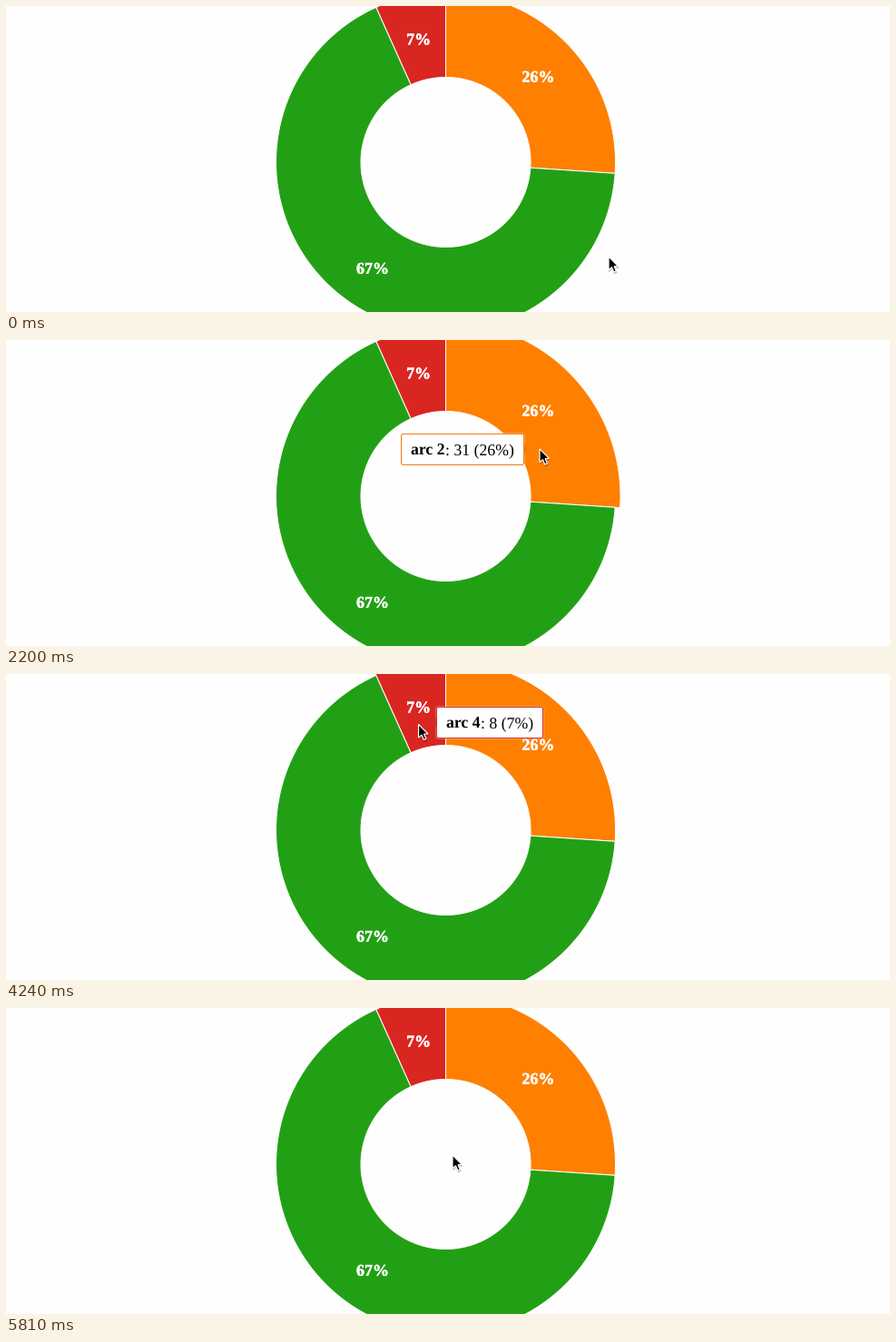
A matplotlib script for the animation above (5.91 s loop, 974x337 px).

```python
import numpy as np
import matplotlib.pyplot as plt
from matplotlib.animation import FuncAnimation
from matplotlib.colors import to_rgb
from matplotlib.patches import FancyBboxPatch, Polygon
from matplotlib.patheffects import withStroke

W, H, DPI = 974, 337, 100
STEP, FRAMES = 30, 197
PX = 72 / DPI
CX, CY, R_OUT, R_IN, GROW = 484.5, 172, 187, 93.5, 5.5
TICK = LAG = 60
LABEL_SIZE, TIP_SIZE = 18, 17.8
PAD, GAP, TIP_H = 11, 17, 34

ARCS = [("arc 2", 31, "#ff7f00"), ("arc 3", 80, "#22a015"),
        ("arc 4", 8, "#d92621")]
TOTAL = sum(value for _, value, _ in ARCS)
BOUNDS = np.cumsum([0] + [value for _, value, _ in ARCS]) / TOTAL * 2 * np.pi

# pointer glides: first and last change, points passed at an even pace
GLIDES = [
    (600, 850, [(664, 276), (518, 269)]),
    (1390, 2200, [(518, 269), (588, 120)]),
    (2850, 3830, [(588, 120), (534, 79), (480, 45), (462, 48)]),
    (4120, 5100, [(462, 48), (452, 58), (424, 66), (376, 105), (371, 111)]),
    (5400, 5810, [(371, 111), (492, 162)]),
]
TIMES = np.concatenate([np.linspace(a - LAG, b - LAG, len(p))
                        for a, b, p in GLIDES])
POINTS = np.concatenate([p for _, _, p in GLIDES])
TICKS = np.concatenate([[0]] + [np.linspace(a, b, round((b - a) / TICK) + 1)
                                for a, b, _ in GLIDES])


def pointer(t):
    return np.array([np.interp(t, TIMES, axis) for axis in POINTS.T])


def arc_under(x, y):
    dx, dy = x - CX, y - CY
    if not R_IN < np.hypot(dx, dy) < R_OUT:
        return None
    angle = np.arctan2(dx, -dy) % (2 * np.pi)
    return int(np.searchsorted(BOUNDS, angle)) - 1


def hover_states():
    """Per tick: how far each arc has grown, and the arc hovered last."""
    levels, last, states = np.zeros(len(ARCS)), 0, []
    for s in TICKS:
        hit = arc_under(*pointer(s - LAG))
        goal = np.arange(len(ARCS)) == hit
        levels = np.clip(levels + np.where(goal, 0.4, -0.4), 0, 1)
        last = last if hit is None else hit
        states.append((levels, last))
    return states


STATES = hover_states()


def polar(angle, r):
    return np.stack([CX + r * np.sin(angle), CY - r * np.cos(angle)], axis=-1)


def ring(k, r):
    a = np.linspace(BOUNDS[k], BOUNDS[k + 1], 160)
    return np.concatenate([polar(a, r), polar(a[::-1], R_IN)])


def muted(color):
    return tuple(0.85 * c + 0.075 for c in to_rgb(color))


def words(x, y, s, size, weight="normal", **kw):
    return ax.text(x, y, s, family="Liberation Serif", weight=weight,
                   size=size * PX, va="baseline", **kw)


def rounded(z, **kw):
    box = FancyBboxPatch((0, 0), 1, 1, zorder=z, **kw,
                         boxstyle="round,pad=0,rounding_size=2")
    return ax.add_patch(box)


plt.rcParams["text.hinting"] = "none"
plt.rcParams["text.hinting_factor"] = 8
fig = plt.figure(figsize=(W / DPI, H / DPI), dpi=DPI, facecolor="#fefefe")
ax = fig.add_axes([0, 0, 1, 1])
ax.set_xlim(0, W)
ax.set_ylim(H, 0)
ax.axis("off")

slices = []
for k, (name, value, color) in enumerate(ARCS):
    shape = Polygon(ring(k, R_OUT), fc=color, ec="white", lw=PX, zorder=1)
    slices.append(ax.add_patch(shape))
    lx, ly = polar(BOUNDS[k:k + 2].mean(), (R_IN + R_OUT) / 2)
    words(lx - 0.5, ly + 7.6, f"{value / TOTAL:.0%}", LABEL_SIZE, "bold",
          color="white", ha="center", zorder=3,
          path_effects=[withStroke(linewidth=0.4 * PX, foreground="white")])

halo = rounded(4, fc="none", ec="white", lw=3 * PX)
notch = ax.add_patch(Polygon(np.zeros((3, 2)), lw=0, zorder=5))
panel = rounded(6, fc="white", lw=PX)
head = words(0, 0, "", TIP_SIZE, "bold", color="black", zorder=7)
body = words(0, 0, "", TIP_SIZE, color="black", zorder=7)
tip_parts = [halo, notch, panel, head, body]

ARROW = 1.04 * np.array([(0, 0), (0, 14.2), (3.3, 11.2), (5.6, 16.4),
                         (8, 15.3), (5.8, 10.3), (10, 10.1)])
shade = ax.add_patch(Polygon(ARROW, fc="black", ec="black", lw=1.5 * PX,
                             alpha=0.18, zorder=8))
arrow = ax.add_patch(Polygon(ARROW, fc="black", ec="white", lw=1.2 * PX,
                             joinstyle="miter", zorder=9))


def place_tip(pos, index, alpha):
    name, value, color = ARCS[index]
    text = f": {value} ({value / TOTAL:.0%})"
    # advance widths in em of the serif face
    head_w = 2.138 * TIP_SIZE
    body_w = (2.277 + 0.5 * sum(c.isdigit() for c in text)) * TIP_SIZE
    width = round(head_w + body_w + 2 * PAD)
    on_left = pos[0] > 478
    x = round(pos[0] - GAP - width if on_left else pos[0] + GAP)
    y = round(pos[1] - GAP)
    for box in (halo, panel):
        box.set_bounds(x + 0.5, y + 0.5, width - 1, TIP_H)
    panel.set_edgecolor(muted(color))
    edge, out = (x + width, 6) if on_left else (x, -6)
    mid = y + TIP_H / 2 + 0.5
    notch.set_xy([(edge, mid - 5), (edge + out, mid), (edge, mid + 5)])
    notch.set_facecolor(muted(color))
    head.set_text(name)
    body.set_text(text)
    head.set_position((x + PAD, y + 24.3))
    body.set_position((x + PAD + head_w, y + 24.3))
    for part in tip_parts:
        part.set_alpha(alpha)
    halo.set_alpha(0.25 * alpha)


def draw(i):
    n = np.searchsorted(TICKS, i * STEP + 20, side="right") - 1
    levels, last = STATES[n]
    for k, shape in enumerate(slices):
        shape.set_xy(ring(k, R_OUT + GROW * levels[k]))

    alpha = min(1, levels.sum())
    for part in tip_parts:
        part.set_visible(alpha > 0)
    if alpha > 0:
        place_tip(pointer(TICKS[n] - LAG), last, alpha)

    tip = pointer(TICKS[n])
    arrow.set_xy(ARROW + tip)
    shade.set_xy(ARROW + tip + (0.5, 1.5))
    return slices + tip_parts + [shade, arrow]


anim = FuncAnimation(fig, draw, frames=FRAMES, interval=STEP, repeat=True,
                     repeat_delay=0, blit=False)
plt.show()
```
